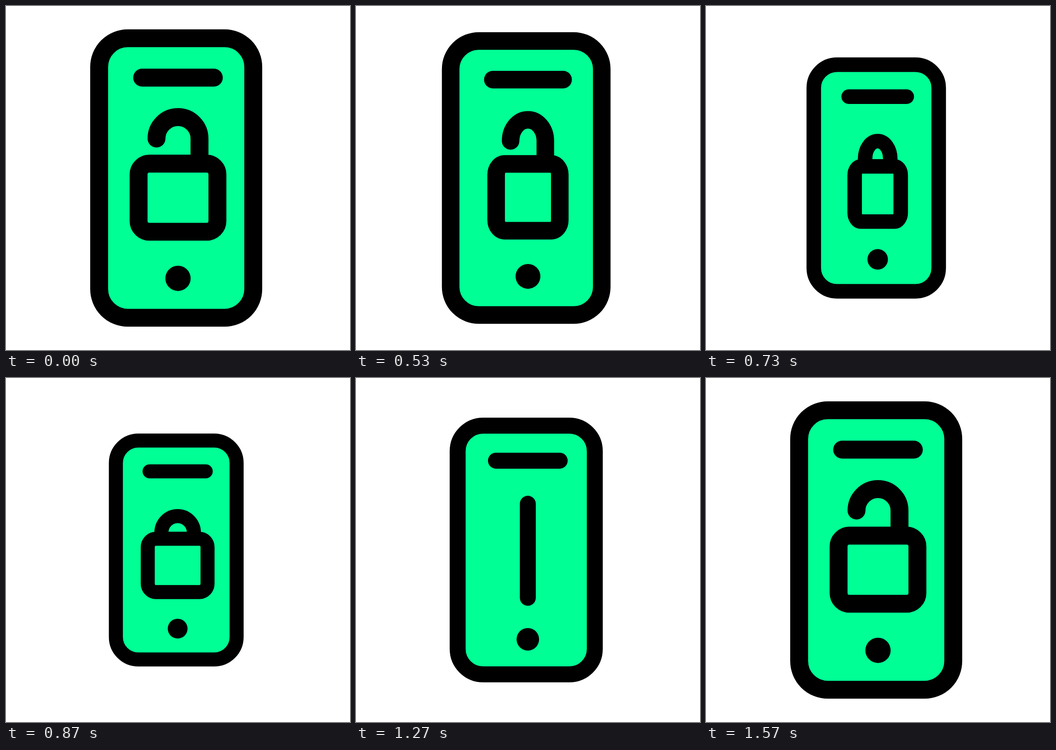
Write an HTML page with a canvas that moves like this. It is 748 px wide and 748 px high and loops after 2.03 s.

```html
<!DOCTYPE html>
<html lang="en">
<head>
<meta charset="utf-8">
<title>Phone lock</title>
<style>
  html, body { margin: 0; width: 100%; height: 100%; overflow: hidden; background: #fff; }
  canvas { display: block; width: 748px; height: 748px; }
</style>
</head>
<body>
<canvas id="stage" width="748" height="748"></canvas>
<script>
const ctx = document.getElementById('stage').getContext('2d');
const SIZE = 748, UNIT = SIZE / 96;   // everything is drawn on a 96-unit grid
const LOOP = 2030, FPS = 30;
const START = 10, MID = 29, END = 47; // shrink and lock, then grow and unlock
const GREEN = '#00ff94';

// cubic-bezier(.8, 0, .2, 1)
function ease(x) {
  if (x <= 0) return 0;
  if (x >= 1) return 1;
  let lo = 0, hi = 1, t = x;
  for (let i = 0; i < 30; i++) {
    t = (lo + hi) / 2;
    const bx = 2.4 * (1 - t) ** 2 * t + 0.6 * (1 - t) * t * t + t ** 3;
    if (bx < x) lo = t; else hi = t;
  }
  return t * t * (3 - 2 * t);
}

function lockedness(step) {
  return step < MID
    ? ease((step - START) / (MID - START))
    : 1 - ease((step - MID) / (END - MID));
}

function phone() {
  ctx.beginPath();
  ctx.roundRect(26, 9, 43, 78, 8);
  ctx.fill();
  ctx.stroke();
  ctx.beginPath();
  ctx.moveTo(38, 20);
  ctx.lineTo(58, 20);
  ctx.stroke();
  ctx.fillStyle = '#000';
  ctx.beginPath();
  ctx.arc(48, 76, 3.53, 0, 7);
  ctx.fill();
}

// The path is squeezed sideways, the line keeps its width.
function lock(flip, drop) {
  ctx.save();
  ctx.translate(48, 0);
  ctx.scale(flip, 1);
  ctx.beginPath();
  ctx.roundRect(-11, 44, 22, 19, 3);
  ctx.moveTo(-6, 37 + drop);
  ctx.arc(0, 37 + drop, 6, Math.PI, 0);
  ctx.lineTo(6, 44);
  ctx.restore();
  ctx.stroke();
}

function draw(time) {
  const step = Math.floor((time % LOOP + 4) * FPS / 1000);
  const p = lockedness(step);
  const scale = 1 - 0.22 * p;
  ctx.setTransform(UNIT, 0, 0, UNIT, 0, 0);
  ctx.fillStyle = '#fff';
  ctx.fillRect(0, 0, 96, 96);
  ctx.translate(47.55, 48);
  ctx.scale(scale, scale);
  ctx.translate(-47.55, -48);
  ctx.lineWidth = 5;
  ctx.lineCap = ctx.lineJoin = 'round';
  ctx.strokeStyle = '#000';
  ctx.fillStyle = GREEN;
  phone();
  lock(1 - 2 * p, 5 * p);
}

const begin = performance.now();
function tick() {
  draw(performance.now() - begin);
  requestAnimationFrame(tick);
}
tick();
</script>
</body>
</html>
```
